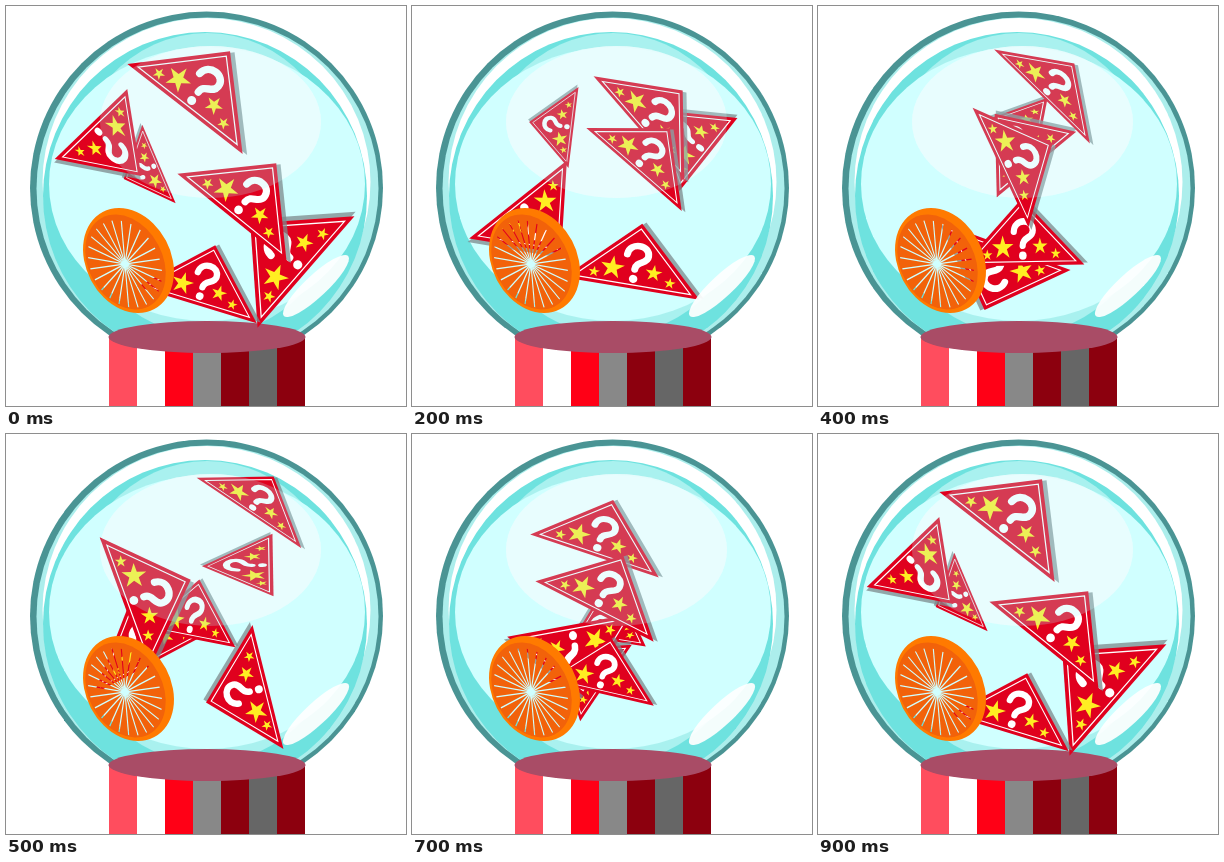
These frames come from a looping animation (400 by 400 pixels, 1 s). An HTML page without scripts:

```html
<!DOCTYPE html>
<html lang="en">
<head>
<meta charset="utf-8">
<title>Prize globe</title>
<style>
html, body { margin: 0; width: 100%; height: 100%; overflow: hidden; background: #fff; }
svg { display: block; width: 100vw; height: 100vh; }

/* Ten ticks per loop; steps(2) adds the halfway pose between two keys. */
.flag { animation: 1s step-end infinite; }
#a { animation-name: a; }
#b { animation-name: b; }
#c { animation-name: c; }
#d { animation-name: d; }
#e { animation-name: e; }
#f { animation-name: f; }

@keyframes a {
  0%, 90%, 100% { translate: 179px 103px; rotate: 38deg; scale: 1.03; }
  10% { translate: 249px 143px; rotate: 43deg; scale: .95; animation-timing-function: steps(2); }
  30% { translate: 205px 102px; rotate: 55deg; scale: 1 .68; animation-timing-function: steps(2); }
  50% { translate: 243px 79px; rotate: 34deg; scale: .89 .62; }
  60% { translate: 209px 108px; rotate: 22deg; scale: .88 .63; animation-timing-function: steps(2); }
  80% { translate: 156px 136px; rotate: 15deg; scale: 1.03; }
}
@keyframes b {
  0%, 90%, 100% { translate: 85px 118px; rotate: 136deg; scale: .71 1.02; }
  10% { translate: 95px 158px; rotate: 139deg; scale: .77 .96; animation-timing-function: steps(2); }
  30% { translate: 117px 229px; rotate: 144deg; scale: .99; animation-timing-function: steps(2); }
  50% { translate: 262px 253px; rotate: 256deg; scale: .9; }
  60% { translate: 228px 258px; rotate: 237deg; scale: 1.03; animation-timing-function: steps(2); }
  80% { translate: 90px 124px; rotate: 102deg; scale: .8 1.02; }
}
@keyframes c {
  0%, 90%, 100% { translate: 153px 158px; rotate: -113deg; scale: .6 .54; }
  10% { translate: 144px 122px; rotate: -99deg; scale: .61; animation-timing-function: steps(2); }
  30% { translate: 179px 121px; rotate: -67deg; scale: .54 .65; animation-timing-function: steps(2); }
  50% { translate: 267px 131px; rotate: -91deg; scale: .44 1; }
  60% { translate: 262px 162px; rotate: -112deg; scale: .45 1; animation-timing-function: steps(2); }
  80% { translate: 172px 191px; rotate: -118deg; scale: .67; }
}
@keyframes d {
  0%, 90%, 100% { translate: 226px 212px; rotate: 39deg; scale: .99; }
  10% { translate: 197px 174px; rotate: 22deg; scale: .92; animation-timing-function: steps(2); }
  30% { translate: 247px 153px; rotate: 60deg; scale: .86 .62; animation-timing-function: steps(2); }
  50% { translate: 118px 170px; rotate: 70deg; scale: 1; }
  60% { translate: 129px 141px; rotate: 35deg; scale: .99; animation-timing-function: steps(2); }
  80% { translate: 236px 214px; rotate: 19deg; scale: .88 .79; }
}
@keyframes e {
  0%, 90%, 100% { translate: 300px 266px; rotate: -49deg; scale: 1.04; }
  10% { translate: 306px 207px; rotate: -52deg; scale: .85 1.04; animation-timing-function: steps(2); }
  30% { translate: 287px 90px; rotate: -51deg; scale: .46 1; animation-timing-function: steps(2); }
  50% { translate: 150px 227px; rotate: -28deg; scale: .99 .85; }
  60% { translate: 108px 188px; rotate: -32deg; scale: .97; animation-timing-function: steps(2); }
  80% { translate: 280px 310px; rotate: -80deg; scale: .33 .7; }
}
@keyframes f {
  0%, 90%, 100% { translate: 191px 299px; rotate: 17deg; scale: .88; }
  10% { translate: 211px 250px; rotate: 32deg; scale: .89 .8; animation-timing-function: steps(2); }
  30% { translate: 228px 315px; rotate: -13deg; scale: 1.05; animation-timing-function: steps(2); }
  50% { translate: 182px 204px; rotate: 11deg; scale: .68 .84; }
  60% { translate: 168px 242px; rotate: -2deg; scale: .75; animation-timing-function: steps(2); }
  80% { translate: 205px 276px; rotate: 28deg; scale: .85; }
}
</style>
</head>
<body>
<svg viewBox="0 0 400 400" xmlns="http://www.w3.org/2000/svg">
  <defs>
    <path id="star" fill="#ffee22" d="M0-1 .22-.31 .95-.31 .36 .12 .59 .81 0 .38-.59 .81-.36 .12-.95-.31-.22-.31z"/>
    <path id="tri" d="M-71 0 0-71 71 0z"/>

    <!-- Origin at the middle of the long edge -->
    <g id="flag">
      <use href="#tri" x="4" y="-2" fill="#7d8a8c" opacity=".75"/>
      <use href="#tri" fill="#e0001e"/>
      <use href="#tri" fill="none" stroke="#fff" stroke-width="1.4" transform="translate(0 -4) scale(.86)"/>
      <use href="#star" transform="translate(-23 -19) scale(13)"/>
      <use href="#star" transform="translate(-41 -11.5) scale(6.2)"/>
      <use href="#star" transform="translate(20 -20) scale(9.2)"/>
      <use href="#star" transform="translate(38 -12) scale(6.2)"/>
      <path fill="none" stroke="#fff" stroke-width="7.2" stroke-linecap="round" d="M-10-36C-9-50 12-50 12-37 12-28 0-31 0-21"/>
      <circle cy="-10.5" r="4.4" fill="#fff"/>
    </g>

    <path id="spoke" d="M0-46V46"/>
    <g id="fan">
      <use href="#spoke"/>
      <use href="#spoke" transform="rotate(15)"/>
      <use href="#spoke" transform="rotate(30)"/>
    </g>
    <mask id="slots" maskUnits="userSpaceOnUse" x="60" y="190" width="120" height="130">
      <path fill="#fff" d="M60 190h120v130H60z"/>
      <g transform="translate(119 258) rotate(-28) scale(.74 1)" stroke="#000" stroke-width="1.4">
        <use href="#fan"/>
        <use href="#fan" transform="rotate(45)"/>
        <use href="#fan" transform="rotate(90)"/>
        <use href="#fan" transform="rotate(135)"/>
        <circle r="3"/>
      </g>
    </mask>
    <ellipse id="glow" cx="204.5" cy="116" rx="110.5" ry="76"/>
  </defs>

  <!-- Globe -->
  <circle cx="200.5" cy="182" r="176.5" fill="#4a9494"/>
  <circle cx="201.500" cy="182.500" r="171" fill="#aceeec"/>
  <circle cx="200.500" cy="176" r="164" fill="#fff"/>
  <ellipse cx="199" cy="190" rx="162" ry="164" fill="#6ee2df"/>
  <ellipse cx="201" cy="178" rx="138" ry="151" fill="#a9f1ef"/>
  <ellipse cx="201" cy="178" rx="158" ry="137" fill="#d0ffff"/>
  <use href="#glow" fill="#fff" opacity=".88"/>

  <!-- Base -->
  <g stroke-width="28">
    <path stroke="#ff4d5e" d="M117 331v69"/>
    <path stroke="#fff" d="M145 331v69"/>
    <path stroke="#ff0016" d="M173 331v69"/>
    <path stroke="#888" d="M201 331v69"/>
    <path stroke="#8c000e" d="M229 331v69"/>
    <path stroke="#666" d="M257 331v69"/>
    <path stroke="#8c000e" d="M285 331v69"/>
  </g>
  <ellipse cx="201" cy="331" rx="98.5" ry="16" fill="#a94c66"/>

  <!-- Flags, back to front -->
  <g id="c" class="flag"><use href="#flag"/></g>
  <g id="e" class="flag"><use href="#flag"/></g>
  <g id="a" class="flag"><use href="#flag"/></g>
  <g id="b" class="flag"><use href="#flag"/></g>
  <g id="f" class="flag"><use href="#flag"/></g>
  <g id="d" class="flag"><use href="#flag"/></g>

  <!-- Slotted disc -->
  <g mask="url(#slots)">
    <ellipse rx="42.4" ry="55" transform="translate(122.5 254.500) rotate(-28)" fill="#ff7a00"/>
    <ellipse rx="37" ry="50" transform="translate(119.5 256) rotate(-28)" fill="#f2620a"/>
  </g>

  <!-- Reflections -->
  <use href="#glow" fill="#aff5f8" opacity=".24"/>
  <ellipse rx="44" ry="11" transform="translate(310 280) rotate(-43)" fill="#fff" opacity=".92"/>
</svg>
</body>
</html>
```
